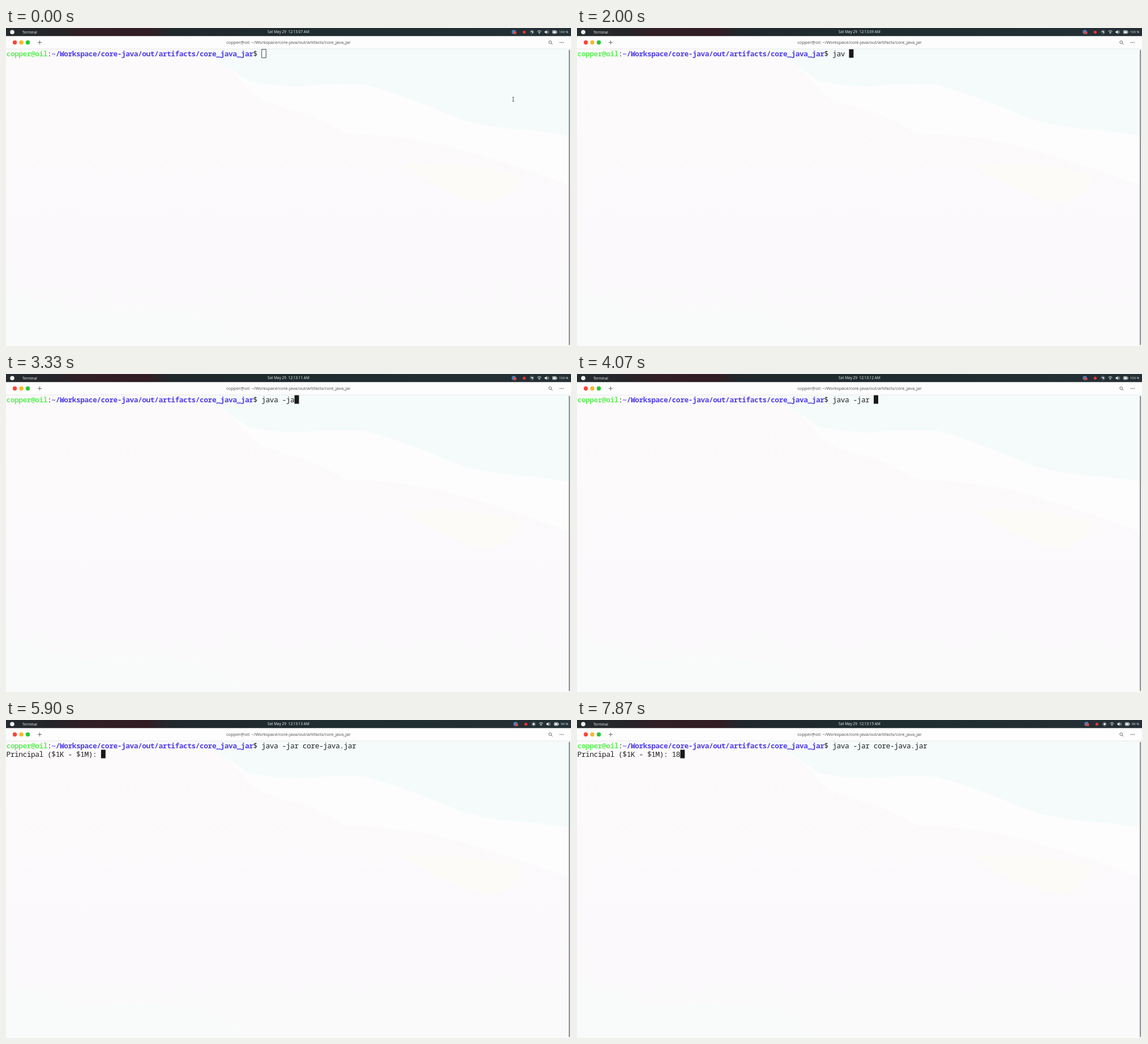
Recreate the animation shown at these times as an HTML page. Size 998 px wide and 561 px high, loop 8 s.

```html
<!DOCTYPE html>
<html lang="en">
<head>
<meta charset="utf-8">
<title>Terminal session</title>
<style>
html, body { margin: 0; width: 100%; height: 100%; overflow: hidden; background: #fbfafb; }
svg { display: block; width: 998px; height: 561px; }
text { white-space: pre; }
.ui { font-family: "Open Sans", "Noto Sans", sans-serif; }
.bar { fill: #f1f3f3; font-size: 6.4px; }
.title { fill: #4a4a4a; font-size: 7.6px; text-anchor: middle; }
.term { font: 13px "Noto Sans Mono", "DejaVu Sans Mono", monospace; letter-spacing: -0.53px; fill: #232323; }
.bold { font-weight: 700; }
</style>
</head>
<body>
<svg viewBox="0 0 998 561" xmlns="http://www.w3.org/2000/svg">
  <defs>
    <linearGradient id="panel">
      <stop offset="0" stop-color="#252c30"/>
      <stop offset=".08" stop-color="#252529"/>
      <stop offset=".14" stop-color="#301f25"/>
      <stop offset=".25" stop-color="#311d23"/>
      <stop offset=".29" stop-color="#20282c"/>
      <stop offset=".55" stop-color="#1f2c30"/>
      <stop offset="1" stop-color="#243035"/>
    </linearGradient>
    <linearGradient id="paper" x1="0" y1="0" x2="0" y2="1">
      <stop offset="0" stop-color="#fcfafa"/>
      <stop offset=".6" stop-color="#fbf9fb"/>
      <stop offset="1" stop-color="#fbfafb"/>
    </linearGradient>
  </defs>

  <!-- translucent terminal over hills -->
  <rect y="37" width="998" height="524" fill="url(#paper)"/>
  <path fill="#fdfdfd" d="M360 50 Q400 70 430 112 Q450 132 520 148 Q560 162 600 186 Q700 190 770 206 Q870 232 998 279 V38 H350Z"/>
  <path fill="#f5fbfb" d="M335 37 Q385 62 425 92 Q460 102 520 103 Q575 97 635 100 Q700 118 800 160 Q850 176 920 180 Q960 184 998 191 V37Z"/>
  <path fill="#fcfbf8" d="M700 240 Q830 232 910 262 Q900 300 850 310 Q770 290 700 240Z"/>
  <path fill="#f9fbfa" d="M0 468 Q70 478 120 505 Q250 492 350 510 Q400 530 420 561 H0Z"/>

  <!-- top panel -->
  <rect width="998" height="14.5" fill="url(#panel)"/>
  <circle cx="11" cy="7.2" r="3.8" fill="#f2f2f2"/>
  <g class="ui bar">
    <text x="29" y="9.5">Terminal</text>
    <text id="clock" x="462" y="9.3" font-size="6.5"></text>
    <text id="charge" y="9.3" style="font-size:5.8px"></text>
  </g>
  <g id="tray" fill="#eef0f0" stroke-linecap="round">
    <circle cx="897" cy="7" r="3.8" fill="#4b7fb5"/>
    <rect x="896.5" y="6.2" width="5" height="4.6" rx="1" fill="#e0454b"/>
    <circle cx="915.3" cy="7.3" r="2.6" fill="#f0323c"/>
    <circle cx="929" cy="7.2" r="2"/>
    <path id="rays" fill="none" stroke="#eef0f0" stroke-width=".9"/>
    <circle id="shade" cx="927.7" cy="8.6" r="1.7" fill="#243035"/>
    <path fill="none" stroke="#eef0f0" stroke-width="1" d="M938.8 6 Q942 3 945.2 6 M940.3 7.7 Q942 6.1 943.7 7.7"/>
    <circle cx="942" cy="9.4" r=".8"/>
    <path d="M951.5 5.8h1.6l2.2-2v6.8l-2.2-2h-1.6z"/>
    <path fill="none" stroke="#eef0f0" stroke-width=".8" d="M956.6 5.6q1 1.6 0 3.2"/>
    <path fill="none" stroke="#8b9698" stroke-width=".8" d="M958 4.4q1.8 2.8 0 5.6"/>
    <rect x="965.3" y="4.6" width="7" height="5.2" rx="1" fill="none" stroke="#eef0f0" stroke-width=".8"/>
    <rect x="966.2" y="5.5" width="5.2" height="3.4"/>
    <rect x="972.6" y="6.1" width="1" height="2.2"/>
  </g>

  <!-- window header -->
  <rect y="14.5" width="998" height="22.5" fill="#fdfdfd"/>
  <rect y="36.6" width="998" height=".8" fill="#e2e2e3"/>
  <circle cx="15.5" cy="25.5" r="3.7" fill="#f7483f"/>
  <circle cx="27" cy="25.5" r="3.7" fill="#fbb62b"/>
  <circle cx="38.5" cy="25.5" r="3.7" fill="#2bc63c"/>
  <g fill="none" stroke="#5c5c5c" stroke-width=".9">
    <path d="M56 25.5h7M59.5 22v7"/>
    <circle cx="961.2" cy="25" r="2.4"/>
    <path d="M963 26.9l2.4 2.2"/>
  </g>
  <g fill="#555">
    <circle cx="978.6" cy="25.6" r=".8"/>
    <circle cx="981.4" cy="25.6" r=".8"/>
    <circle cx="984.2" cy="25.6" r=".8"/>
  </g>
  <text class="ui title" x="499" y="28.2">copper@oil: ~/Workspace/core-java/out/artifacts/core_java_jar</text>
  <rect x="994" y="38.5" width="2.3" height="521" rx="1.1" fill="#8d8f8f"/>

  <!-- terminal text -->
  <rect id="block" width="7.9" height="15" fill="#191919"/>
  <rect id="hollow" x="451.7" y="37.7" width="7.6" height="14.8" fill="none" stroke="#333" stroke-width=".9"/>
  <g id="lines" class="term"></g>
  <path id="pointer" fill="none" stroke="#56565e" stroke-width="1" d="M894.3 122.2h3.4M896 122.2v7M894.3 129.2h3.4"/>
</svg>
<script>
const LOOP = 8000, CELL = 7.27, LEFT = 0.7, TOP = 37.5, ROW = 15, BLINK = 600;
const PROMPT = 62, OUTPUT = "Principal ($1K - $1M): ";
const FOCUS = 270, HIDE = 900, ENTER = 5600, PRINT = 5900, POWER = 5630;
const TICK = 70;

const command = [
  [0, ""], [900, "j"], [970, "ja"], [1330, "jav"], [1870, "jav "],
  [2100, "jav"], [2270, "java"], [2930, "java "], [3000, "java -"],
  [3230, "java -j"], [3330, "java -ja"], [3500, "java -jar"], [3670, "java -jar "],
  [4230, "java -jar c"], [4330, "java -jar co"], [4500, "java -jar cor"],
  [4600, "java -jar core"], [5000, "java -jar core-java.jar "]
];
const answer = [[0, ""], [7500, "1"], [7800, "18"]];
const strokes = [FOCUS, ...command.slice(1).map(k => k[0]), ENTER, ...answer.slice(1).map(k => k[0])];

const $ = id => document.getElementById(id);
const colX = c => LEFT + c * CELL;
const latest = (steps, t) => steps.filter(s => s[0] <= t).pop()[1];
const show = (el, on) => el.setAttribute("visibility", on ? "visible" : "hidden");
const put = (el, s) => { if (el.textContent !== s) el.textContent = s; };

function addText(col, row, str, fill, bold) {
  const el = document.createElementNS("http://www.w3.org/2000/svg", "text");
  el.setAttribute("x", colX(col) - 0.3);
  el.setAttribute("y", TOP + row * ROW + 12.2);
  if (fill) el.setAttribute("fill", fill), el.style.fill = fill;
  if (bold) el.setAttribute("class", "bold");
  el.textContent = str;
  $("lines").append(el);
  return el;
}

addText(0, 0, "copper@oil", "#62f05c", true);
addText(10, 0, ":");
addText(11, 0, "~/Workspace/core-java/out/artifacts/core_java_jar", "#5040e6", true);
addText(60, 0, "$");
const typed = addText(PROMPT, 0, "");
const reply = addText(0, 1, "");

let rays = "";
for (let i = 0; i < 8; i++) {
  const a = i * Math.PI / 4, x = Math.cos(a), y = Math.sin(a);
  rays += `M${929 + 3 * x} ${7.2 + 3 * y}L${929 + 3.5 * x} ${7.2 + 3.5 * y}`;
}
$("rays").setAttribute("d", rays);

function draw(t) {
  const cmd = latest(command, t), entered = t >= ENTER;
  const out = t >= PRINT ? OUTPUT + latest(answer, t) : "";
  put(typed, cmd);
  put(reply, out);

  const focused = t >= FOCUS;
  const last = strokes.filter(s => s <= t).pop() || 0;
  const lit = Math.floor((t - last) / BLINK) % 2 === 0;
  $("block").setAttribute("x", colX(entered ? out.length : PROMPT + cmd.length));
  $("block").setAttribute("y", TOP + (entered ? ROW : 0));
  show($("block"), focused && lit);
  show($("hollow"), !focused);
  show($("pointer"), t < HIDE);

  const sec = 8 + Math.floor((t - TICK) / 1000);
  put($("clock"), `Sat May 29  12:13:${String(sec).padStart(2, "0")} AM`);

  const drained = t >= POWER;
  $("tray").setAttribute("transform", `translate(${drained ? 3 : 0})`);
  $("charge").setAttribute("x", drained ? 980 : 977);
  put($("charge"), drained ? "99 %" : "100 %");
  show($("shade"), !drained);
}

const start = performance.now();
function frame(now) {
  draw(Math.max(0, now - start) % LOOP);
  requestAnimationFrame(frame);
}
draw(0);
requestAnimationFrame(frame);
</script>
</body>
</html>
```
